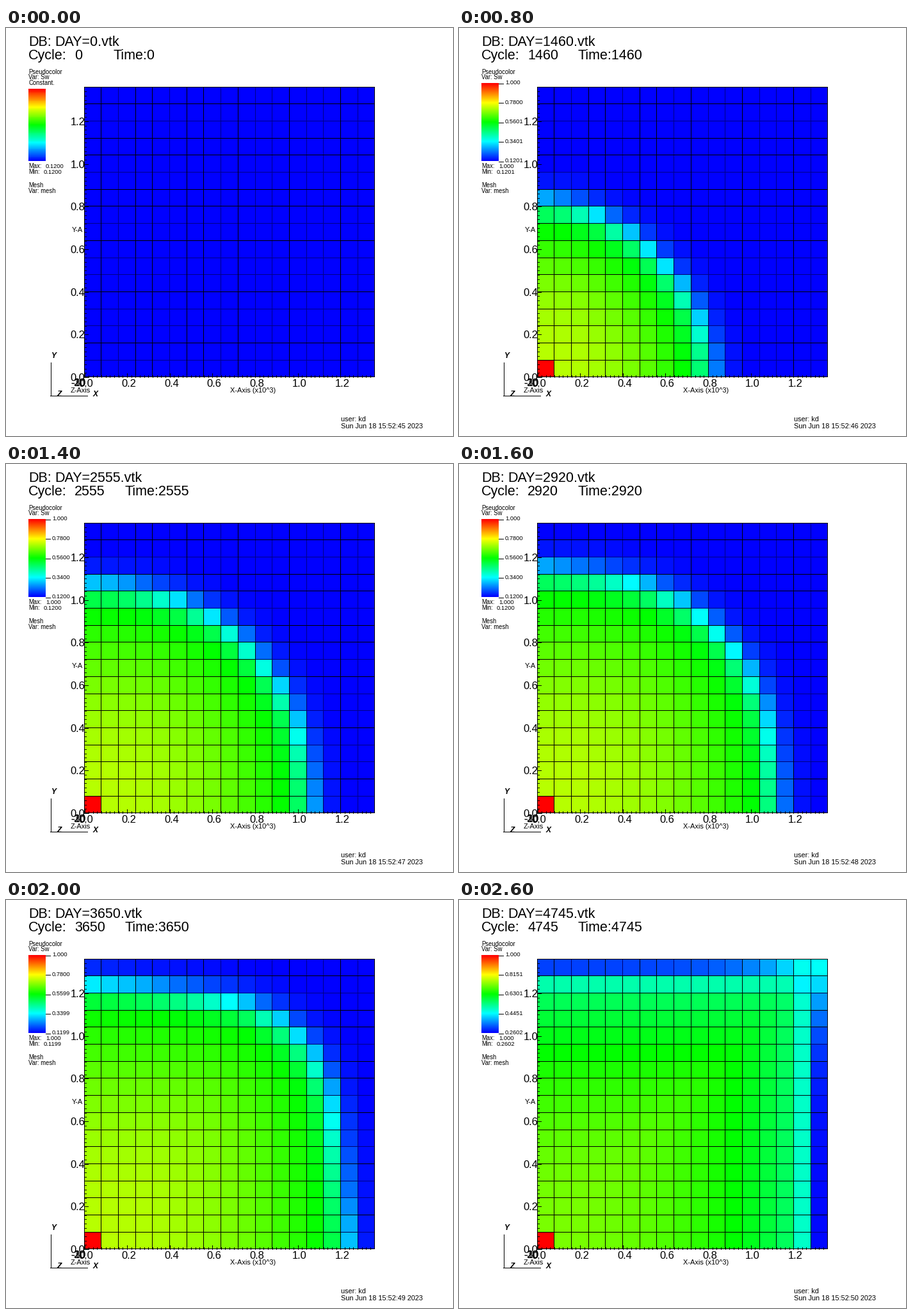
Animation, 698 px wide and 638 px high, one loop 2800 ms. Source, as a matplotlib script:

```python
import numpy as np
import matplotlib.pyplot as plt
from matplotlib.animation import FuncAnimation

W, H, DPI = 698, 638, 64
PX = 72 / DPI                      # points per pixel
FRAMES, STEP = 14, 200
N = 17                             # cells per side
LEFT, TOP, SIZE = 122, 92, 454     # mesh box in pixels
UNIT = 333.3                       # pixels per 1.0 on the axes

SECONDS = [45, 45, 46, 46, 46, 47, 47, 47, 48, 48, 49, 49, 49, 50]
MINIMA = [.12, .121, .1203, .1202, .12012, .12012, .12, .12, .12,
          .11988, .11988, .11988, .12456, .26016]

# Flood front: radius, roundness (1/p of the norm) and edge tilt over time
KEYS = [2, 4, 6, 8, 10, 12, 13]
ROUND = [.57, .571, .485, .379, .217, .05, .03]
TILT = [0, 0, .03, .05, .085, .045, 0]
LATE_RADIUS = [14.2, 14.75, 15.2, 15.5, 15.65]
FRONT_D = [-1.5, -.7, -.45, 0, .35, .5, .8, 1.3, 2.2]
FRONT_T = [.5, .425, .37, .25, .165, .11, .06, .02, 0]


def rainbow(t):
    stops = [0, .25, .5, .75, 1]
    channels = ([0, 0, 0, 1, 1], [0, 1, 1, 1, 0], [1, 1, 0, 0, 0])
    return np.stack([np.interp(t, stops, c) for c in channels], axis=-1)


def saturation(k):
    """Water saturation per cell, row 0 at the bottom."""
    if k < 2:
        return np.full((N, N), MINIMA[k])
    y, x = np.mgrid[0:N, 0:N].astype(float)
    radius = np.sqrt(22.7 * k) if k < 9 else LATE_RADIUS[k - 9]
    inv = np.interp(k, KEYS, ROUND)
    ys = y * .988
    dist = (x ** (1 / inv) + ys ** (1 / inv)) ** inv
    dist += np.interp(k, KEYS, TILT) * np.minimum(x, ys)
    u = np.clip(dist / (radius - 1.5), 0, 1)
    t = np.where(u < 1, .5 + .18 * (1 - u ** 2.3),
                 np.interp(dist - radius, FRONT_D, FRONT_T))
    if k == FRAMES - 1:            # breakthrough at the far corner
        rim = np.maximum(x, y) == N - 1
        t += rim * .28 * np.exp(-(2 * (N - 1) - x - y) / 2.5)
    t[0, 0] = 1
    return .12 + .88 * t


edges = np.floor(26.7 * np.arange(N + 1)).astype(int)
cell_of = np.clip(np.searchsorted(edges, np.arange(SIZE)) - 1, 0, N - 1)


def mesh_image(k):
    low = MINIMA[k]
    cells = rainbow(np.clip((saturation(k) - low) / (1 - low), 0, 1))[::-1]
    img = cells[cell_of][:, cell_of]
    luma = img @ np.array([.299, .587, .114])
    faint = np.zeros_like(img)
    faint[..., 2] = .6 * np.clip(img[..., 2] - luma, 0, 1)
    odd, even = edges[edges % 2 == 1], edges[edges % 2 == 0]
    img[odd] = faint[odd]
    img[:, odd] = faint[:, odd]
    img[even] = 0
    img[:, even] = 0
    img[[0, -1]] = 0
    img[:, [0, -1]] = 0
    return img


fig = plt.figure(figsize=(W / DPI, H / DPI), dpi=DPI, facecolor="white")
ax = fig.add_axes([0, 0, 1, 1])
ax.axis("off")


def put(x, y, text="", size=9.5, **kw):
    return ax.text(x, y, text, fontsize=size * PX, family="Liberation Sans",
                   va="baseline", color="black", zorder=5, **kw)


def line(x0, y0, x1, y1):
    return ax.plot([x0, x1], [y0, y1], color="black", lw=PX, zorder=4,
                   antialiased=False, solid_capstyle="butt")[0]


mesh = ax.imshow(mesh_image(0), extent=(LEFT, LEFT + SIZE, TOP + SIZE, TOP),
                 interpolation="nearest", aspect="auto", zorder=1)
bar = ax.imshow(rainbow(np.linspace(1, 0, 122))[:, None], aspect="auto",
                extent=(35, 62, 208, 95), interpolation="nearest", zorder=1)
ax.set_xlim(0, W)
ax.set_ylim(H, 0)

# Axis ticks and numbers
base = TOP + SIZE - .5
for i in range(68):
    pos = i * .02 * UNIT
    reach = 6 if i % 10 == 0 else 3
    tx, ty = int(LEFT + pos) + .5, int(base - pos) + .5
    line(tx, base, tx, base - reach)
    line(LEFT, ty, LEFT + reach, ty)
    if i % 10 == 0:
        label = f"{i * .02:.1f}"
        put(125 + pos, 561, label, 16.5, ha="center")
        put(123.5, 552 - pos, label, 16.5, ha="right")
for label in ("-30", "-20", "-10"):
    put(124, 560, label, 16, ha="right")
put(101, 570, "Z-Axis", 11)
put(350, 570, "X-Axis (x10^3)", 11)
put(103, 319, "Y-A", 11)

# Orientation triad
line(69.5, 523, 69.5, 575)
line(69, 574.5, 127, 574.5)
for x, y, name in ((71, 516, "Y"), (136, 576, "X"), (79, 576, "Z")):
    put(x, y, name, 12, weight="bold", style="italic")

# Fixed captions
put(35, 28, "DB:", 21.5)
put(35, 49, "Cycle:", 21.5)
put(35, 72, "Pseudocolor")
put(35, 80, "Var: Sw")
put(35, 219, "Max:")
put(35, 228, "Min:")
put(35, 249, "Mesh")
put(35, 258, "Var: mesh")
put(523, 615, "user: kd", 10.9)

# Changing captions
db = put(76, 28, size=21.5)
cycle = put(107, 49, size=21.5)
clock = put(185, 49, size=21.5)
stamp = put(523, 626, size=10.9)
constant = put(35, 89, "Constant.")
top_val = put(62, 219, size=9.2)
low_val = put(59, 228, size=9.2)
scale_y = 86.5 + 30.4 * np.arange(5)
scale_text = [put(72, y + 2, size=9.2) for y in scale_y]
scale_mark = [line(62, int(y) + .5, 69, int(y) + .5) for y in scale_y]


def update(k):
    day = str(365 * k)
    flat = k < 2
    low = MINIMA[k]
    high = low if flat else 1.00006 if k >= 12 else 1.0
    mesh.set_data(mesh_image(k))
    bar.set_extent((35, 62, 208, 95 if flat else 86))
    ax.set_xlim(0, W)
    ax.set_ylim(H, 0)
    db.set_text(f"DAY={day}.vtk")
    cycle.set_text(day)
    clock.set_text(f"Time:{day}")
    clock.set_x(161 + 6 * len(day))
    stamp.set_text(f"Sun Jun 18 15:52:{SECONDS[k]} 2023")
    constant.set_visible(flat)
    top_val.set_text(f"{high:.4f}" if flat else "1.000")
    low_val.set_text(f"{low:.4f}")
    for i, (text, mark) in enumerate(zip(scale_text, scale_mark)):
        value = high + (low - high) * i / 4
        text.set_text("1.000" if i == 0 else f"{value:.4f}")
        text.set_visible(not flat)
        mark.set_visible(not flat)
    return []


anim = FuncAnimation(fig, update, frames=FRAMES, interval=STEP,
                     init_func=lambda: update(0), repeat=True,
                     repeat_delay=0, blit=False)
plt.show()
```
